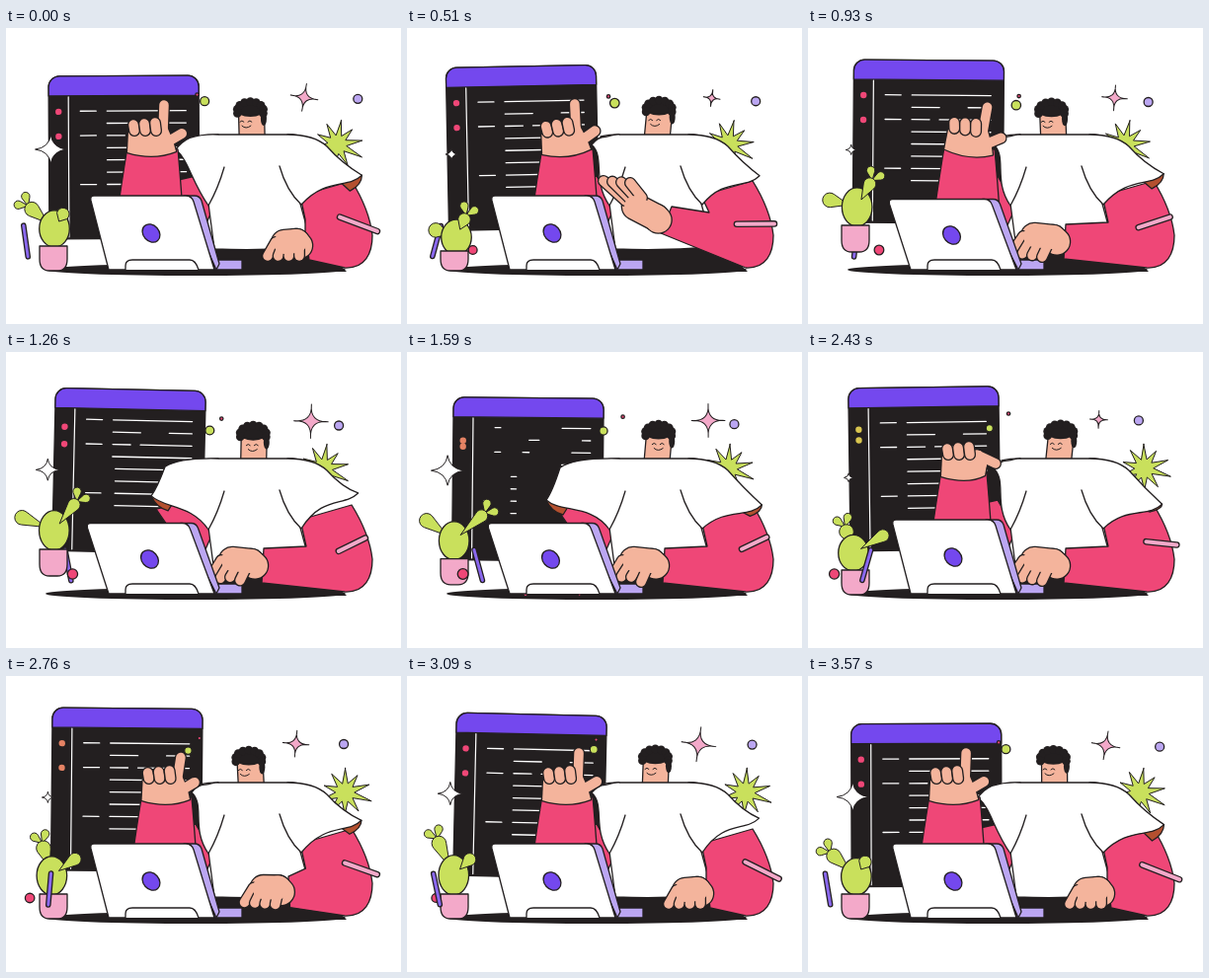
An HTML page with a canvas for the animation above (3.6 s loop, 400x300 px).

```html
<!DOCTYPE html>
<html lang="en">
<head>
<meta charset="utf-8">
<title>Desk loop</title>
<style>
html, body { margin: 0; width: 100%; height: 100%; overflow: hidden; background: #fff; }
canvas { display: block; width: 400px; height: 300px; }
</style>
</head>
<body>
<canvas id="stage" width="400" height="300"></canvas>
<script>
const LOOP = 3600, STEP = 30, HALF = LOOP / 2, QUARTER = LOOP / 4;
const INK = '#231f20', WHITE = '#fff', PURPLE = '#7448ee', LILAC = '#bba6f2', VIOLET = '#8a68ee',
  RED = '#ef4777', SKIN = '#f4b49c', GREEN = '#c9e05c', PINK = '#f3a9c9', BROWN = '#b4502f';
const LINE = 1.3;
const c = document.getElementById('stage').getContext('2d');
c.lineJoin = c.lineCap = 'round';

// ---- timing helpers ----
const clamp = v => Math.max(0, Math.min(1, v));
const smooth = v => (v = clamp(v), v * v * (3 - 2 * v));
const mix = (a, b, k) => a + (b - a) * k;
const rad = deg => deg * Math.PI / 180;
const wave = (t, mid, amp, peak, period = LOOP) =>
  mid + amp * Math.cos(2 * Math.PI * (t - peak) / period);
// Rises from a to b, holds, falls from d to e.
const hold = (t, a, b, d, e) => smooth((t - a) / (b - a)) * (1 - smooth((t - d) / (e - d)));

// How far each action has gone at time t, 0 to 1.
const actions = t => ({
  lowered: hold(t, 950, 1350, 1950, 2400),
  open: hold(t, 60, 480, 540, 930),
  typing: hold(t, 540, 930, 2450, 3000),
  tilt: hold(t, 540, 930, 1950, 2400),
  point: hold(t, 950, 1350, 2450, 2850),
  reach: Math.max(0, wave(t, 0, 1, 0)) ** 6,
  squeeze: hold(t, 1000, 1600, 2250, 2800),
  amber: hold(t, 1300, 1900, 2500, 3000),
  crouch: hold(t, 250, 500, 520, 650),
  jump: hold(t, 560, 900, 1400, 1800),
  sprout: hold(t, 100, 500, 1700, 2200)
});

// ---- drawing helpers ----
function paint(fill, stroke = INK, width = LINE) {
  if (fill) { c.fillStyle = fill; c.fill(); }
  if (stroke) { c.strokeStyle = stroke; c.lineWidth = width; c.stroke(); }
}
function path(d, fill, stroke = INK, width = LINE) {
  const p = new Path2D(d);
  if (fill) { c.fillStyle = fill; c.fill(p); }
  if (stroke) { c.strokeStyle = stroke; c.lineWidth = width; c.stroke(p); }
}
function oval(x, y, rx, ry, fill, stroke = INK, turn = 0) {
  c.beginPath();
  c.ellipse(x, y, rx, ry, turn, 0, 7);
  paint(fill, stroke);
}
const ball = (x, y, r, fill, stroke) => oval(x, y, r, r, fill, stroke);
function line(x1, y1, x2, y2, color, width = LINE) {
  c.beginPath();
  c.moveTo(x1, y1);
  c.lineTo(x2, y2);
  paint(null, color, width);
}
// Capsules merged under one outline: [x1, y1, x2, y2, width]
function limbs(list, fill) {
  list.forEach(([a, b, d, e, w]) => line(a, b, d, e, INK, w + 2 * LINE));
  list.forEach(([a, b, d, e, w]) => line(a, b, d, e, fill, w));
}
function stick(x, y, len, deg, width, fill) {
  const dx = Math.cos(rad(deg)) * len / 2, dy = Math.sin(rad(deg)) * len / 2;
  limbs([[x - dx, y - dy, x + dx, y + dy, width]], fill);
}
function sparkle(x, y, rx, ry, fill, pinch, turn = 0) {
  c.save();
  c.translate(x, y);
  c.rotate(turn);
  c.beginPath();
  c.moveTo(0, -ry);
  for (let i = 0; i < 4; i++) {
    const a = i * Math.PI / 2, s = Math.sin(a), k = Math.cos(a);
    c.quadraticCurveTo((s + k) * rx * pinch, (s - k) * ry * pinch, k * rx, s * ry);
  }
  paint(fill, INK, 1);
  c.restore();
}

// ---- scene parts ----
// Dashes of one row of code, as [from, to] pairs.
function dashes(row) {
  const list = row === 1 ? [[59, 87], [116, 139]] : row === 2 ? [[59, 77], [87, 139]] : [[59, 139]];
  return [0, 2, 6].includes(row) ? [[32, 48], ...list] : list;
}
function codeWindow(t, act) {
  c.save();
  c.translate(wave(t, 120.5, 4, 1278, HALF), wave(t, 123.5, 8, 0, HALF));
  c.rotate(wave(t, 0, 0.022, 1278, HALF));
  c.translate(-76, -83);
  c.beginPath();
  c.roundRect(0, 0, 152, 165, [11, 11, 3, 3]);
  paint(INK);
  c.beginPath();
  c.roundRect(0, 0, 152, 20, [11, 11, 0, 0]);
  paint(PURPLE);
  line(20, 21, 20, 163, WHITE, 1.2);

  const tone = `rgb(${mix(239, 217, act.amber)},${mix(71, 198, act.amber)},${mix(119, 79, act.amber)})`;
  ball(10, 36 + 8 * act.squeeze, 3.2, tone, null);
  ball(10, 61 - 11 * act.squeeze, 3.2, tone, null);

  for (let row = 0; row < 8; row++) {
    const now = t + (row < 4 ? 0 : 180);
    const back = now >= 1750;
    const from = back ? 0 : clamp((now - 1430) / 250), to = back ? clamp((now - 1750) / 300) : 1;
    if (to - from < 0.01) continue;
    const y = 35.5 + row * 12.4 - 5 * act.lowered;
    dashes(row).forEach(([a, b]) => line(mix(a, b, from), y, mix(a, b, to), y, WHITE));
  }
  c.restore();
}

function burst(t) {
  const x = wave(t, 332, 11.5, 2870), y = 118, turn = wave(t, 0.1, 0.12, 600);
  c.beginPath();
  for (let i = 0; i < 20; i++) {
    const a = i * Math.PI / 10 + turn, r = i % 2 ? 9.5 : 25 + 3.5 * Math.sin(i * 2.3);
    c.lineTo(x + r * Math.sin(a), y - r * Math.cos(a));
  }
  c.closePath();
  paint(GREEN, INK, 1);
}

function head(t, act) {
  const x = wave(t, 250.5, 5.5, 590, QUARTER), y = wave(t, 85.5, 1.2, 150, QUARTER);
  const neck = mix(251, x, 0.5), eye = x - 4.5 + 4 * act.lowered, look = y + 9;
  path(`M${x - 12} ${y - 4}L${neck - 13} 113H${neck + 13}L${x + 14} ${y - 4}Z`, SKIN);
  oval(x, y - 4, 15, 8, INK, null);
  for (let i = 0; i < 9; i++) {
    const a = Math.PI * (0.92 + i * 0.145);
    ball(x + 13.5 * Math.cos(a), y - 2 + 9.5 * Math.sin(a), 4.3, INK, null);
  }
  oval(x + 13.5, y + 6, 3, 7, INK, null);
  c.beginPath();
  [-4, 4].forEach(dx => {
    c.moveTo(eye + dx - 2, look);
    c.quadraticCurveTo(eye + dx, look - 2.5, eye + dx + 2, look);
  });
  c.moveTo(eye - 4, look + 4);
  c.quadraticCurveTo(eye, look + 8, eye + 5, look + 4);
  paint(null, INK, 1);
}

// Right arm points: elbow crook, wrist top and bottom, palm ends,
// first and last knuckle, first and last fingertip.
const DESK = [[303, 194], [303, 206], [307, 235], [282, 218], [294, 217], [273, 217], [297, 218], [265, 231], [297, 231]];
const OPEN = [[306, 187], [268, 181], [257, 208], [231, 181], [252, 192], [221, 175], [238, 172], [199, 155], [226, 157]];
const TYPE = [[304, 197], [261, 199], [259, 234], [229, 211], [248, 213], [218, 211], [245, 215], [207, 227], [237, 232]];

function rightArm(t, act) {
  const points = DESK.map((p, i) => p.map((v, j) =>
    v + (OPEN[i][j] - v) * act.open + (TYPE[i][j] - v) * act.typing));
  const [crook, top, low, palmA, palmB, firstK, lastK, firstT, lastT] = points;
  path(`M298 170L${crook}L${top}L${low}L343 243C364 244 371 228 371 210Q368 184 350 155Z`, RED);

  const wrist = [(top[0] + low[0]) / 2 - 8, (top[1] + low[1]) / 2];
  limbs([[...palmA, ...palmB, 26], [...palmB, ...wrist, 26]], SKIN);
  for (let i = 0; i < 4; i++) {
    const k = i / 3, tap = act.lowered * 2.5 * Math.sin(2 * Math.PI * t / 300 + i * 1.6);
    limbs([[mix(firstK[0], lastK[0], k), mix(firstK[1], lastK[1], k),
      mix(firstT[0], lastT[0], k), mix(firstT[1], lastT[1], k) + tap, 9.5]], SKIN);
  }
  line(...palmA, ...palmB, SKIN, 22);
}

function leftArm(t, act) {
  const x = mix(162 - 15 * act.reach - 3 * act.point, 150, act.lowered), y = mix(126, 238, act.lowered);
  const low = Math.min(y + 60, 243), slim = 5 * act.point;
  path(`M${x - 24} ${y - 5}Q${x - 28} ${y + 18} ${x - 34} ${low}H${x + 32 - slim}` +
    `Q${x + 29 - slim} ${y + 18} ${x + 27 - slim} ${y - 3}Z`, RED);
  c.save();
  c.translate(x, y);
  c.rotate(rad(8 * act.tilt - 5 * act.open));
  const palm = `M-23 -20L-24 0Q2 8 ${25 - slim} -1L22 -12L16 -26Z`;
  const fingers = [
    [12, -22, mix(13, 31, act.point), mix(-48, -13, act.point), 9.5],
    [14, -9, mix(31, 17, act.point), mix(-19, -12, act.point), 10]
  ];
  path(palm, INK, INK, 2 * LINE);
  limbs(fingers, SKIN);
  path(palm, SKIN, null);
  for (let i = 0; i < 3; i++) {
    const fx = -18 + i * 11;
    limbs([[fx, -28 - i, fx + 1, -22, 9.5]], SKIN);
  }
  c.restore();
}

function shirtBody() {
  path('M152 159L192 150L210 182L202 200L172 188Z', RED);
  path('M205 216H312L345 247H205Z', INK, null);
  path('M196 110Q204 108 215 108H290Q305 109 306 118L298 178L310 222Q260 226 211 224L205 178Z', WHITE);
}

function rightSleeve(t) {
  const x = wave(t, 358.5, 2, 850, QUARTER), y = wave(t, 148, 7, 700, QUARTER);
  const fold = wave(t, 0.5, 0.6, 850, QUARTER);
  if (fold > 0.1)
    path(`M${x} ${y}Q${x} ${y + 9 * fold} ${x - 12} ${y + 15 * fold}L${x - 24} ${y + 5}Z`, BROWN);
  path(`M285 108Q312 108 325 120Q340 137 ${x} ${y}` +
    `C${x - 14} ${y + 14} ${x - 36} ${y + 2} 299 179Q284 165 277 140`, WHITE);
}

function leftSleeve(act) {
  const x = mix(188 - 16 * act.reach, 141, act.lowered), y = mix(118 + 5 * act.reach, 150, act.lowered);
  if (x < 165)
    path(`M${x} ${y}Q${x + 5} ${y + 12} ${x + 17} ${y + 15}L${x + 22} ${y + 7}Z`, BROWN);
  path(`M215 108Q${x + 28} 107 ${x + 14} ${mix(108, y, 0.22)}Q${x + 6} ${y - 8} ${x} ${y}` +
    `C${x + 14} ${y + 13} 187 154 205 180Q215 162 221 141`, WHITE);
}

function laptopLid(act) {
  const x = 85 - 3.5 * act.tilt, y = 170 + 3.5 * act.tilt;
  path(`M${x + 95} ${y}H${x + 106}Q${x + 111} ${y} ${x + 113} ${y + 5}L216 239L213 245Z`, LILAC);
  path(`M${x + 4} ${y}H${x + 97}Q${x + 103} ${y} ${x + 105} ${y + 6}L211 245H104L${x + 1} ${y + 5}Q${x} ${y} ${x + 4} ${y}Z`, WHITE);
  path('M121 245V241Q121 235 128 235H186Q192 235 195 245', WHITE);
  oval(147 - 1.5 * act.tilt, 208 + 2 * act.tilt, 10, 8, PURPLE, INK, 0.85);
}

// A drop from (x, y) in a direction measured from straight up; returns its tip.
function leaf(x, y, deg, len, r) {
  const a = rad(deg - 90), tx = x + len * Math.cos(a), ty = y + len * Math.sin(a);
  c.beginPath();
  c.moveTo(x, y);
  c.arc(tx, ty, r, a - 1.9, a + 1.9);
  c.closePath();
  paint(GREEN, INK, 1);
  return [tx, ty];
}
function branch(x, y, deg, len, r, buds) {
  const a = rad(deg - 90), cos = Math.cos(a), sin = Math.sin(a), tip = len + r * 0.7;
  if (buds > 0.1) [-35, 35].forEach(side =>
    leaf(x + cos * tip, y + sin * tip, deg + side, 10 * buds, 4.2 * buds));
  leaf(x + cos * 9, y + sin * 9, deg, len - 9, r);
}
function cactus(t, act) {
  const berry = () => ball(wave(t, 48, 24, 900), 225, wave(t, 4.8, 0.6, HALF), RED);
  const pencil = () => stick(wave(t, 47, -27, 0), 216, 32, wave(t, 90, -16, 1500, HALF), 3, VIOLET);
  const berryFront = t > LOOP / 4 && t < LOOP * 3 / 4, pencilFront = t > HALF;
  if (!berryFront) berry();
  if (!pencilFront) pencil();

  const top = 221 + 5 * act.crouch - 21 * act.jump, x = wave(t, 48, 2, 600);
  const ry = wave(t, 19, 1.2, 1250, HALF), y = top + 1 - ry + 3 * act.crouch;
  branch(x, y, wave(t, -46, 30, 2640), wave(t, 29, 7, 1400, HALF), 7.3, 1 - act.sprout);
  oval(x, y, 15.3, ry, GREEN);
  branch(x, y, wave(t, 42, 18, 2300), wave(t, 28, 11, 1900), 6.3, act.sprout);

  const end = 246 - 19 * act.jump;
  path(`M34 ${top}H62V${end - 12}Q62 ${end} 52 ${end}H44Q34 ${end} 34 ${end - 12}Z`, PINK);
  if (berryFront) berry();
  if (pencilFront) pencil();
}

function floaters(t) {
  ball(wave(t, 197.5, 14, 750), wave(t, 77, 3, 1590), wave(t, 4.2, 0.6, 600), GREEN);
  ball(wave(t, 205, 14, 1450), wave(t, 66, 3.5, 630), 1.7, RED);
  ball(wave(t, 343, 13.5, 100), wave(t, 72, 3, 930), 4.5, LILAC);
  const size = wave(t, 13.2, 4.7, 1400, HALF);
  sparkle(wave(t, 302, 8.5, 900), wave(t, 69.7, 1.3, 600), size, size, PINK, -0.08, wave(t, 0.08, 0.09, 0));
  const shine = wave(t, 10.5, 6.3, 1640, HALF);
  sparkle(wave(t, 43, 2.5, 200), wave(t, 123.5, 4.5, 480, HALF), shine, shine * 0.9, WHITE, 0.12);
}

function draw(t) {
  const act = actions(t);
  c.fillStyle = WHITE;
  c.fillRect(0, 0, 400, 300);
  codeWindow(t, act);
  floaters(t);
  burst(t);
  oval(192, 245, 152, 6, INK, null);
  head(t, act);
  shirtBody();
  path('M211 235H239V245H211Z', LILAC);
  leftSleeve(act);
  rightArm(t, act);
  rightSleeve(t);
  leftArm(t, act);
  laptopLid(act);
  stick(wave(t, 355, 4.7, 2950), wave(t, 196, 3, 200), wave(t, 34, 6.5, 0), wave(t, 0, 27, 3200), 4, PINK);
  cactus(t, act);
}

const start = performance.now();
function tick() {
  const t = Math.max(0, performance.now() - start) % LOOP;
  draw(Math.floor(t / STEP) * STEP);
  requestAnimationFrame(tick);
}
tick();
</script>
</body>
</html>
```
